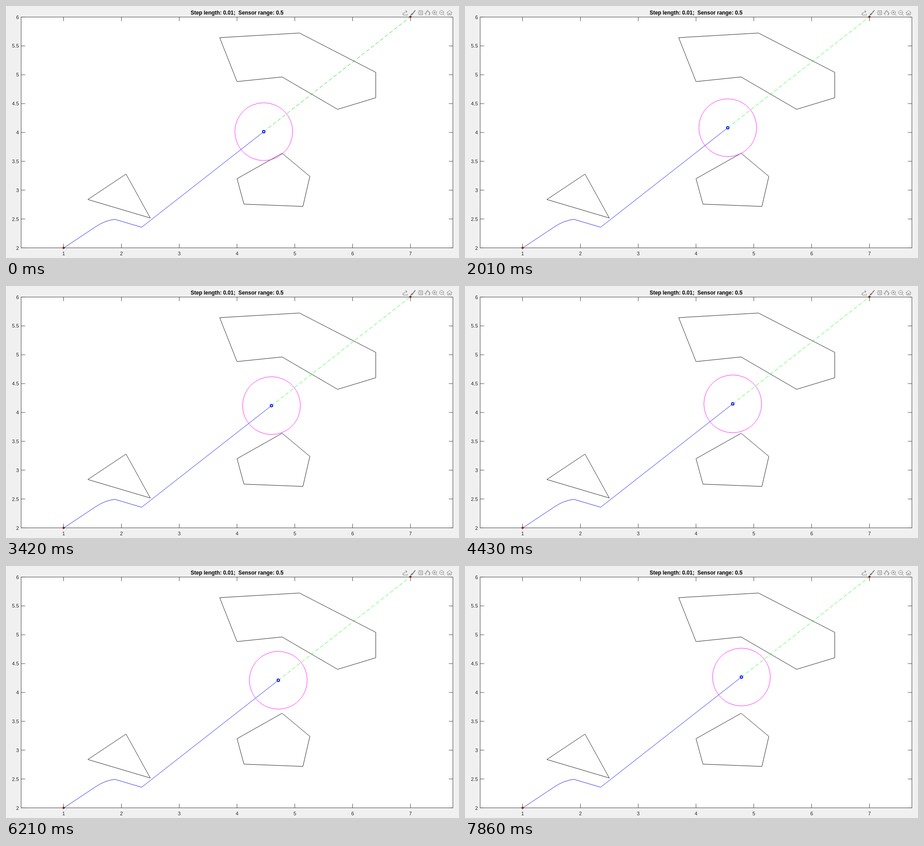
An HTML page for the animation above (8000 ms loop, 1003 by 558 pixels).

```html
<!DOCTYPE html>
<html lang="en">
<head>
<meta charset="utf-8">
<title>Path planning</title>
<style>
  html, body { margin: 0; width: 100%; height: 100%; overflow: hidden; background: #f0f0f0; }
  svg { display: block; width: 1003px; height: 558px; fill: none; stroke-width: .85; }
  text { font: 11px "Liberation Sans", Arial, sans-serif; fill: #262626; }
  .title { font-size: 11.9px; font-weight: bold; fill: #000; white-space: pre; }
  .axes { stroke: #262626; }
  .icons { stroke: #858585; stroke-width: 1; stroke-linejoin: round; stroke-linecap: round; }
  .plot * { vector-effect: non-scaling-stroke; }
</style>
</head>
<body>
<svg viewBox="0 0 1003 558">
  <defs>
    <g id="lens"><circle r="4.600"/><path d="M3.500 3.500l3 3M-2 0h4"/></g>
    <path id="diamond" d="M0-2.600L2.600 0 0 2.600-2.600 0z" fill="#c00000" stroke="#400"/>
  </defs>
  <rect x="33.5" y="24.500" width="956" height="511" fill="#fff"/>

  <!-- Plot units: one unit is 128 pixels, y points up -->
  <g class="plot" transform="matrix(128 0 0 -128 -.5 792)">
    <g stroke="#000">
      <path d="M3.700 5.640L5.080 5.720 6.400 5.040V4.600L5.740 4.400 4.780 4.960 4 4.880z"/>
      <path d="M4.780 3.640L5.260 3.240 5.140 2.720 4.120 2.760 4 3.200z"/>
      <path d="M2.080 3.280L2.500 2.520 1.420 2.840z"/>
    </g>
    <path id="trail" stroke="#00f"/>
  </g>

  <g class="axes">
    <rect x="33.500" y="24.500" width="956" height="511"/>
    <path id="ticks"/>
  </g>
  <g id="labels"></g>
  <text class="title" x="511.500" y="19" text-anchor="middle">Step length: 0.01;  Sensor range: 0.5</text>

  <g class="icons">
    <path d="M879 15v5h10v-2M881 17q1-5 7-5m-3-2l3 2-3 3"/>
    <path d="M906 10l-5 6" stroke-width="2"/>
    <path d="M901 16q-4 0-5 4 5 1 5-4" fill="#858585"/>
    <path d="M914.500 10.500h8v9h-8v-3l-2-1.500 2-1.500zm2 3h4m-4 3h4"/>
    <path d="M930.500 20.500l-3-5 3 1v-5m2 2v-4m2 4v-4m2 5v-3m2 3v4l-2 2z"/>
    <use href="#lens" x="948.500" y="14.500"/>
    <path d="M948.500 12.500v4"/>
    <use href="#lens" x="964.500" y="14.500"/>
    <path d="M976 15l6-5 6 5m-10-1v6h3v-4h2v4h3v-6"/>
  </g>
  <use href="#diamond" x="127.500" y="535.500"/>
  <use href="#diamond" x="895.500" y="24"/>

  <g class="plot" transform="matrix(128 0 0 -128 -.5 792)">
    <circle class="moving" r=".5" stroke="#f0f"/>
    <circle class="moving" r=".021" stroke="#00f" stroke-width="2" fill="#fff"/>
    <path id="goalLine" stroke-dasharray="8.200 4.900"/>
  </g>
</svg>
<script>
const LOOP = 8000, PACE = 184.5, FIRST_STEP = 150;
const SLOWDOWN = { start: 2010, length: 1410, delay: 300 };
const STEP_LENGTH = 0.01;
const START = { x: 4.4625, y: 4.0135 }, GOAL = { x: 7, y: 6 };
const heading = Math.atan2(GOAL.y - START.y, GOAL.x - START.x);
const $ = id => document.getElementById(id);

let ticks = '', labels = '';
for (let v = 1; v <= 7; v++) {
  const x = 128 * v - 0.5;
  ticks += `M${x} 24.5v9M${x} 535.5v-9`;
  labels += `<text x="${x}" y="552" text-anchor="middle">${v}</text>`;
}
for (let v = 2; v <= 6; v += 0.5) {
  const y = 24.5 + (6 - v) * 511 / 4;
  ticks += `M33.5 ${y}h9M989.5 ${y}h-9`;
  labels += `<text x="28.5" y="${y + 4}" text-anchor="end">${v}</text>`;
}
$('ticks').setAttribute('d', ticks);
$('labels').innerHTML = labels;

// Steps come at an even pace, apart from one slower stretch.
function stepsAt(t) {
  const slowed = Math.min(Math.max((t - SLOWDOWN.start) / SLOWDOWN.length, 0), 1);
  return Math.floor((t - FIRST_STEP - slowed * SLOWDOWN.delay) / PACE) + 1;
}

function draw(now) {
  const steps = stepsAt(now % LOOP);
  const x = START.x + steps * STEP_LENGTH * Math.cos(heading);
  const y = START.y + steps * STEP_LENGTH * Math.sin(heading);
  for (const circle of document.querySelectorAll('.moving')) {
    circle.setAttribute('cx', x);
    circle.setAttribute('cy', y);
  }
  $('trail').setAttribute('d', `M1 2L1.56 2.373Q1.715 2.476 1.887 2.497L2.35 2.36 ${x} ${y}`);
  $('goalLine').setAttribute('d', `M${x} ${y}L${GOAL.x} ${GOAL.y}`);
  $('goalLine').setAttribute('stroke', steps ? '#0f0' : '#0c0');
  requestAnimationFrame(draw);
}
draw(performance.now());
</script>
</body>
</html>
```
